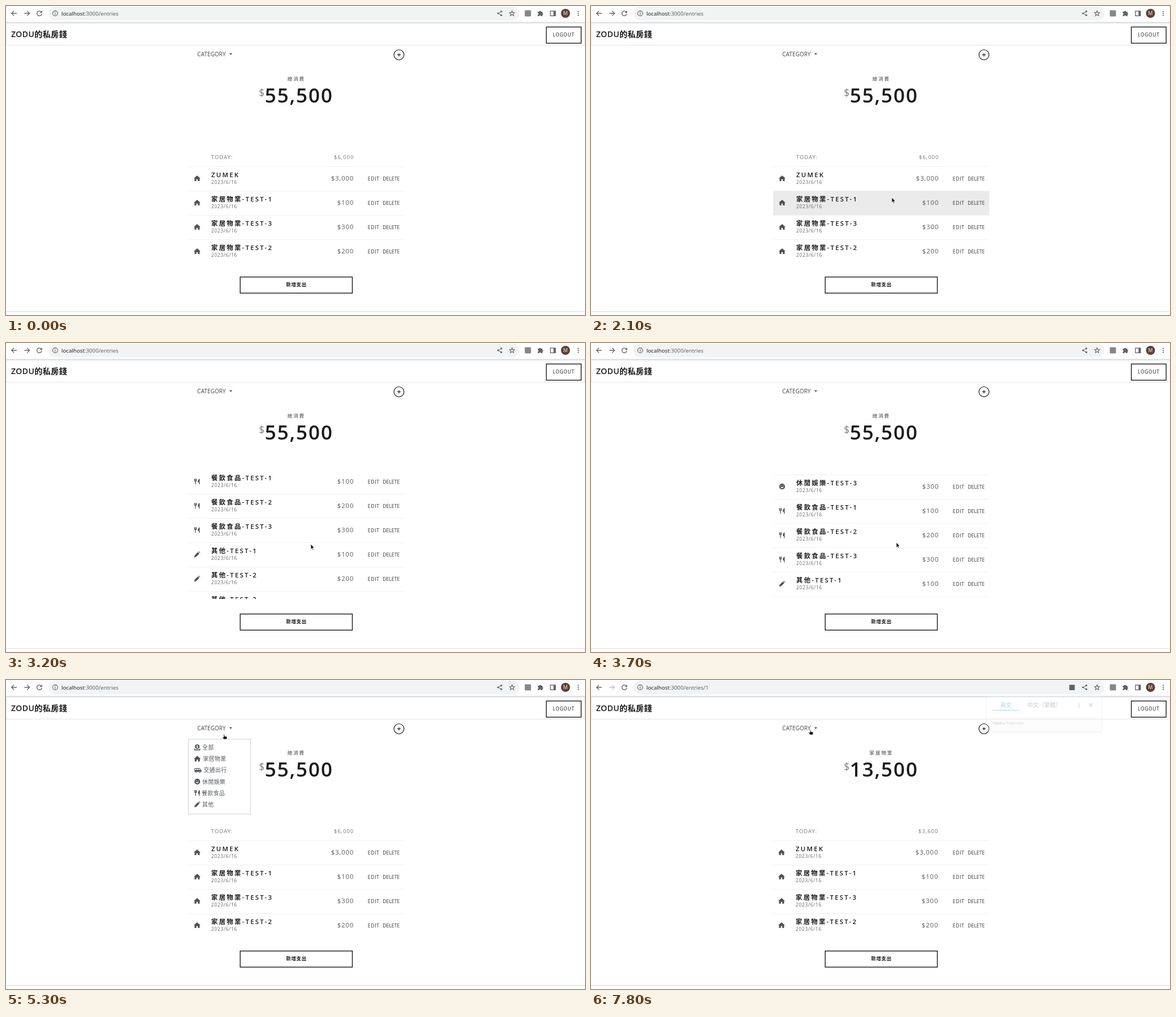
An HTML page for the animation above (8000 ms loop, 1024 by 547 pixels).

```html
<!DOCTYPE html>
<html lang="zh-Hant">
<head>
<meta charset="utf-8">
<title>Entries</title>
<style>
html, body { margin: 0; width: 100%; height: 100%; overflow: hidden; background: #fff; }
svg { display: block; width: 100%; height: 100%; }
text { font-family: "Open Sans", "Noto Sans CJK TC", "Noto Sans CJK", sans-serif; fill: #1a1a1a; white-space: pre; }
.end { text-anchor: end; }
.mid { text-anchor: middle; }
.url, .status { font-family: "Noto Sans", sans-serif; font-size: 9.7px; }
.url { fill: #202124; }
.url .path { fill: #5f6368; }
.status { font-size: 8px; fill: #5f6368; }
.brand { font-size: 14.2px; font-weight: 600; letter-spacing: .3px; }
.logout { font-size: 8.4px; font-weight: 500; letter-spacing: .75px; }
.category { font-size: 9.9px; font-weight: 500; letter-spacing: .15px; fill: #444; }
.label { font-size: 8.5px; font-weight: 700; letter-spacing: 1.9px; fill: #7b7b7b; }
.dollar { font-size: 17.4px; fill: #7b7b7b; }
.total { font-size: 35px; font-weight: 600; letter-spacing: 2px; }
.today { font-size: 9.5px; font-weight: 500; letter-spacing: .95px; fill: #777; }
.title { font-size: 11.4px; font-weight: 600; letter-spacing: 2.25px; }
.date { font-size: 8.3px; font-weight: 500; letter-spacing: .75px; fill: #666; }
.amount { font-size: 11.4px; letter-spacing: .85px; fill: #5c5c5c; }
.edit, .delete { font-size: 8.5px; font-weight: 500; fill: #333; }
.edit { letter-spacing: .75px; }
.delete { letter-spacing: .08px; }
.add { font-size: 8.5px; font-weight: 700; letter-spacing: .7px; }
.item { font-size: 9.9px; letter-spacing: .35px; fill: #55595c; }
.avatar { font-size: 8.6px; fill: #fff; }
.tab { font-size: 10px; font-weight: 700; fill: #777; }
.tab.on { fill: #1a8fd8; }
.credit { font-size: 7.4px; fill: #666; }
.line { fill: none; stroke: #5f6368; stroke-width: 1.3; }
.frame { fill: #fff; stroke: #1a1a1a; stroke-width: 1.4; }
.icon { fill: #4d5257; }
.icon .cut { fill: #fff; }
.icon .stroke { fill: none; stroke: #4d5257; stroke-width: 1.2; }
.active text { fill: #fff; }
.cursor path { fill: #111; stroke: #fff; stroke-width: .7; }
</style>
</head>
<body>
<svg id="stage" viewBox="0 0 1024 547" xmlns="http://www.w3.org/2000/svg"></svg>
<script>
const ROW = 43, LIST_TOP = 284.5, ITEM = 20.15, MENU_TOP = 109.3;

const icons = {
  all: '<circle cy="-1.4" r="4"/><path d="M-5.2 1.6V5H5.2V1.6L3 3.6H-3Z"/><path class="cut" d="M-.4-4H.4V-3.3L1.5-3V-2.2L-.5-2.3 1.5-1V.2L.4.8V1.3H-.4V.8L-1.5.4V-.4L.5-.3-1.5-1.5V-2.7L-.4-3.3Z"/>',
  home: '<path d="M0-5.2 6 0H4.5V4.8H1.3V1.5H-1.3V4.8H-4.5V0H-6Z"/>',
  van: '<path d="M-6-3.7H3L6.2 0V2.8H-6Z"/><path class="cut" d="M-5-2.6H-2.8V-.4H-5ZM-1.8-2.6H.6V-.4H-1.8ZM1.6-2.6H2.7L4.5-.4H1.6Z"/><circle cx="-3.2" cy="2.8" r="1.7"/><circle cx="3.2" cy="2.8" r="1.7"/><circle class="cut" cx="-3.2" cy="2.8" r=".7"/><circle class="cut" cx="3.2" cy="2.8" r=".7"/>',
  smile: '<circle r="5.1"/><circle class="cut" cx="-1.8" cy="-1.4" r=".75"/><circle class="cut" cx="1.8" cy="-1.4" r=".75"/><path class="cut" d="M-2.9.8H2.9A3 2.6 0 0 1-2.9.8Z"/>',
  food: '<path class="stroke" d="M-4.6-5V-2A1.7 1.7 0 0 0-1.2-2V-5M-2.9-5V5"/><path d="M4.5-5V5H3.2V1.5H1.2C1.2-2 2-4.2 4.5-5Z"/>',
  pen: '<path d="M-5.2 5.2-4.4 1.8 1.3-3.9 3.9-1.3-1.8 4.4ZM2.1-4.7 3-5.4 5.4-3 4.7-2.1Z"/>'
};
const categories = [
  ['all', '全部', 347.3], ['home', '家居物業', 348.5], ['van', '交通出行', 349.5],
  ['smile', '休閒娛樂', 347.2], ['food', '餐飲食品', 346.3], ['pen', '其他', 347]
];
const entries = [['home', 'ZUMEK', '3,000']];
for (const [kind, name] of categories.slice(1))
  for (const n of kind === 'home' ? [1, 3, 2] : [1, 2, 3])
    entries.push([kind, `${name}-TEST-${n}`, `${n}00`]);

const text = (x, y, cls, str, id = '') => `<text x="${x}" y="${y}" class="${cls}"${id && ` id="${id}"`}>${str}</text>`;
const icon = (kind, x, y) => `<g class="icon" transform="translate(${x} ${y})">${icons[kind]}</g>`;
const rule = (y, color, x1 = 0, x2 = 1024, w = 1) => `<path d="M${x1} ${y}H${x2}" stroke="${color}" stroke-width="${w}"/>`;
const dots = (x, y, gap, r) => [-1, 0, 1].map(k => `<circle cx="${x}" cy="${y + k * gap}" r="${r}" fill="#5f6368"/>`).join('');
const star = (cx, cy) => Array.from({ length: 10 }, (_, k) => {
  const r = k % 2 ? 2.1 : 4.8, a = k * Math.PI / 5;
  return `${cx + r * Math.sin(a)},${cy - r * Math.cos(a)}`;
}).join(' ');

const toolbar = `
  <rect x="75" y="1" width="833" height="24.5" rx="12.2" fill="#f1f3f4"/>
  ${rule(29, '#d6d8da', 0, 1024, 1.6)}
  <g class="line">
    <path d="M19 13H10M14.2 8.6 9.8 13 14.2 17.4"/>
    <path id="forward" d="M32.5 13H41.5M37.3 8.6 41.7 13 37.3 17.4"/>
    <path id="reload" d="M62.3 10.4A4.3 4.3 0 1 0 63.2 13.9M63.4 8.4V11.5H60.2"/>
    <path id="stop" d="M55.2 9.2 62.8 16.8M62.8 9.2 55.2 16.8"/>
    <circle cx="87" cy="13" r="4.4" stroke-width="1.1"/><path d="M87 12.4V15.6M87 10.3V11.4" stroke-width="1.1"/>
    <path d="M876 9.7 870.2 13 876 16.3" stroke-width="1"/>
    <polygon points="${star(895, 13.3)}" stroke-width="1.1"/>
    <rect x="962.8" y="9" width="9" height="8.4"/>
  </g>
  <g fill="#5f6368">
    <circle cx="876" cy="9.7" r="1.6"/><circle cx="870.2" cy="13" r="1.6"/><circle cx="876" cy="16.3" r="1.6"/>
    <rect x="968.3" y="9" width="3.5" height="8.4"/>
    <path d="M940.5 10H943A1.6 1.6 0 0 1 946.2 10H948.7V12.6A1.6 1.6 0 0 1 948.7 15.7V18H946.2A1.6 1.6 0 0 0 943 18H940.5V15.6A1.6 1.6 0 0 0 940.5 12.5Z"/>
    <rect id="translate" x="846" y="8.5" width="9.5" height="9.5"/>
  </g>
  <rect x="917.5" y="7.5" width="11" height="11" rx="1.5" fill="#85888b"/>
  <circle cx="989.5" cy="13" r="8" fill="#5d4037"/>
  ${text(989.5, 16.2, 'avatar mid', 'M')}
  ${dots(1012, 13, 3.4, 1.1)}
  <text class="url" x="98" y="17">localhost<tspan class="path" id="path"></tspan></text>`;

const header = `
  <rect x=".5" y="30.7" width="1023" height="38.6" fill="#fff" stroke="#e6e6e6"/>
  ${text(9, 55, 'brand', 'ZODU的私房錢')}
  <rect class="frame" x="955.6" y="37.2" width="61.6" height="28.6"/>
  ${text(967, 54.2, 'logout', 'LOGOUT')}
  ${text(338.3, 88.8, 'category', 'CATEGORY')}
  <path d="M394.8 83.8H400.2L397.5 86.6Z" fill="#444"/>
  <circle class="frame" cx="695" cy="86.4" r="8.9" style="stroke-width:1.2"/>
  <path d="M692 86.4H698M695 83.4V89.4" stroke="#1a1a1a" stroke-width="1.1"/>
  ${text(513.4, 131.6, 'label mid', '', 'label')}
  ${text(447.2, 160, 'dollar', '$')}
  ${text(457.8, 171, 'total', '', 'total')}`;

const row = ([kind, name, amount], i) => {
  const y = LIST_TOP + ROW * i;
  return `${rule(y, '#f0f0f0', 322, 704.5)}
  <g class="cols">${icon(kind, 338, y + 20.7)}
    ${text(363, y + 18.5, 'title', name)}${text(363, y + 30.6, 'date', '2023/6/16')}
    ${text(615.3, y + 24.8, 'amount end', '$' + amount)}</g>
  ${text(639.8, y + 24.1, 'edit', 'EDIT')}${text(666.3, y + 24.1, 'delete', 'DELETE')}`;
};

const list = `
  <clipPath id="view"><rect x="322" y="233" width="383" height="220"/></clipPath>
  <g clip-path="url(#view)"><g id="list">
    <rect id="hover" x="322" width="382.5" height="${ROW}" fill="#ebebeb"/>
    <g class="cols">${text(363, 271.2, 'today', 'TODAY:')}${text(615.3, 271.2, 'today end', '', 'today')}</g>
    ${entries.map(row).join('')}
  </g></g>
  <rect class="frame" x="414.2" y="479.7" width="198.3" height="28.6"/>
  ${text(513.6, 496.2, 'add mid', '新增支出')}
  ${rule(541, '#e4e4e4', 0, 1024, 1.4)}`;

const menu = `
  <g id="menu">
    <rect x="322.5" y="104.7" width="110" height="132.6" fill="#fff" stroke="#cfcfcf"/>
    ${categories.map(([kind, name, x], i) => {
      const y = MENU_TOP + ITEM * (i + .5);
      return `<g class="option"><rect x="323" y="${y - ITEM / 2}" width="109" height="${ITEM}" fill="none"/>
        ${icon(kind, kind === 'van' ? 339.4 : 338.3, y)}${text(x, y + 3.7, 'item', name)}</g>`;
    }).join('')}
  </g>`;

const popup = `
  <g id="popup" opacity=".26">
    <rect x="698" y="29" width="206" height="64" rx="2" fill="#999" opacity=".35"/>
    <rect x="699" y="29" width="204" height="62" fill="#fff"/>
    <rect x="699" y="66" width="204" height="25" fill="#f4f4f4"/>
    ${text(733.8, 47.6, 'tab on mid', '英文')}${text(771.5, 47.6, 'tab', '中文（繁體）')}
    ${rule(53.6, '#1a8fd8', 710, 758, 1.5)}
    ${dots(863, 44, 3.2, 1)}
    <path class="line" d="M881 41 887 47M887 41 881 47"/>
    <text class="credit" x="710" y="78.6"><tspan font-weight="600">Veldra</tspan> Translate</text>
  </g>`;

const cursor = `
  <g id="cursor" class="cursor">
    <path id="arrow" d="M0 0V9.2L2.1 7.3 3.6 10.6 5 10 3.5 6.8H6.3Z"/>
    <path id="hand" d="M-1 .6C-1-.4.5-.4.5.6V3.3L4 4C4.8 4.2 5.1 4.8 5 5.6L4.5 8.9H-.8L-3 5.8C-3.4 4.7-2.4 4.2-1 5.5Z"/>
  </g>`;

document.getElementById('stage').innerHTML = '<rect width="1024" height="547" fill="#fff"/>' + toolbar + header + list + menu +
  text(4, 543.5, 'status', 'localhost:3000/entries/1', 'status') + popup + cursor;

// Each key is [ms, ...values]; equal neighbours make a pause.
const pointer = [
  [200, 72, 1], [700, 627, 108], [800, 627, 108], [1100, 600, 300], [1300, 562, 464], [1700, 523, 334],
  [1800, 524, 335], [1900, 524, 335], [2100, 532, 339], [2500, 539, 356], [3400, 539, 356], [3700, 540, 353],
  [4600, 540, 353], [4900, 399, 93], [5000, 399, 93], [5100, 386, 91], [5200, 386, 91], [5300, 386, 96],
  [5700, 366, 158], [5800, 366, 158], [6000, 363, 139], [6700, 363, 139], [6800, 390, 122], [6900, 390, 122],
  [7000, 386, 101], [7100, 386, 101], [7200, 386, 92], [7300, 386, 92], [7400, 388, 88]
];
const scrolling = [
  [2100, 0], [2500, 345], [2700, 345], [2800, 361], [2900, 361], [3000, 430], [3100, 430], [3200, 490],
  [3300, 519], [3400, 519], [3500, 505], [3600, 505], [3700, 438], [3800, 330], [3900, 330], [4000, 120],
  [4100, 15], [4200, 15], [4300, 0]
];

function sample(keys, t) {
  const next = keys.findIndex(k => k[0] > t);
  if (next < 0) return keys[keys.length - 1].slice(1);
  if (next === 0) return keys[0].slice(1);
  const a = keys[next - 1], b = keys[next], u = (t - a[0]) / (b[0] - a[0]);
  return a.slice(1).map((v, i) => v + (b[i + 1] - v) * u);
}

const $ = id => document.getElementById(id);
const show = (id, on) => { $(id).style.display = on ? '' : 'none'; };
const options = [...document.querySelectorAll('.option')];
const columns = [...document.querySelectorAll('.cols')];

function hoveredRow(t) {
  if (t < 900 || t >= 3000) return -1;
  const at = Math.min(t, 2500), [, y] = sample(pointer, at), [offset] = sample(scrolling, at);
  return y < 453 ? Math.floor((y + offset - LIST_TOP) / ROW) : -1;
}

function draw(t) {
  const [x, y] = sample(pointer, t), [offset] = sample(scrolling, t);
  const filtered = t >= 7700, loading = t >= 6700 && !filtered;
  const hand = t >= 7000 || (t >= 5100 && t < 6700);

  show('cursor', t >= 200);
  show('arrow', !hand);
  show('hand', hand);
  $('cursor').setAttribute('transform', `translate(${x} ${y})`);

  const hovered = hoveredRow(t);
  show('hover', hovered >= 0);
  $('hover').setAttribute('y', LIST_TOP + ROW * hovered);
  $('list').setAttribute('transform', `translate(0 ${-Math.round(offset)})`);
  for (const g of columns) g.setAttribute('transform', `translate(${filtered ? -1 : 0} 0)`);

  show('menu', t >= 5300 && t < 6700);
  const picked = Math.floor((y - MENU_TOP) / ITEM), pressed = t === 6400;
  options.forEach((g, i) => {
    const on = i === picked;
    g.classList.toggle('active', on && pressed);
    g.firstElementChild.setAttribute('fill', !on ? 'none' : pressed ? '#1a1a1a' : '#f7f7f9');
  });
  show('status', t === 5900);
  $('status').setAttribute('opacity', .35);

  show('reload', !loading);
  show('stop', loading);
  show('translate', filtered);
  show('popup', t >= 7800);
  $('forward').style.stroke = filtered ? '#bdc1c6' : '';
  $('path').textContent = filtered ? ':3000/entries/1' : ':3000/entries';
  $('label').textContent = filtered ? '家居物業' : '總消費';
  $('total').textContent = filtered ? '13,500' : '55,500';
  $('today').textContent = filtered ? '$3,600' : '$6,000';
}

const start = performance.now();
let last = -1;
function tick() {
  const t = Math.floor((performance.now() - start) % 8000 / 100) * 100;
  if (t !== last) draw(last = t);
  requestAnimationFrame(tick);
}
tick();
</script>
</body>
</html>
```
